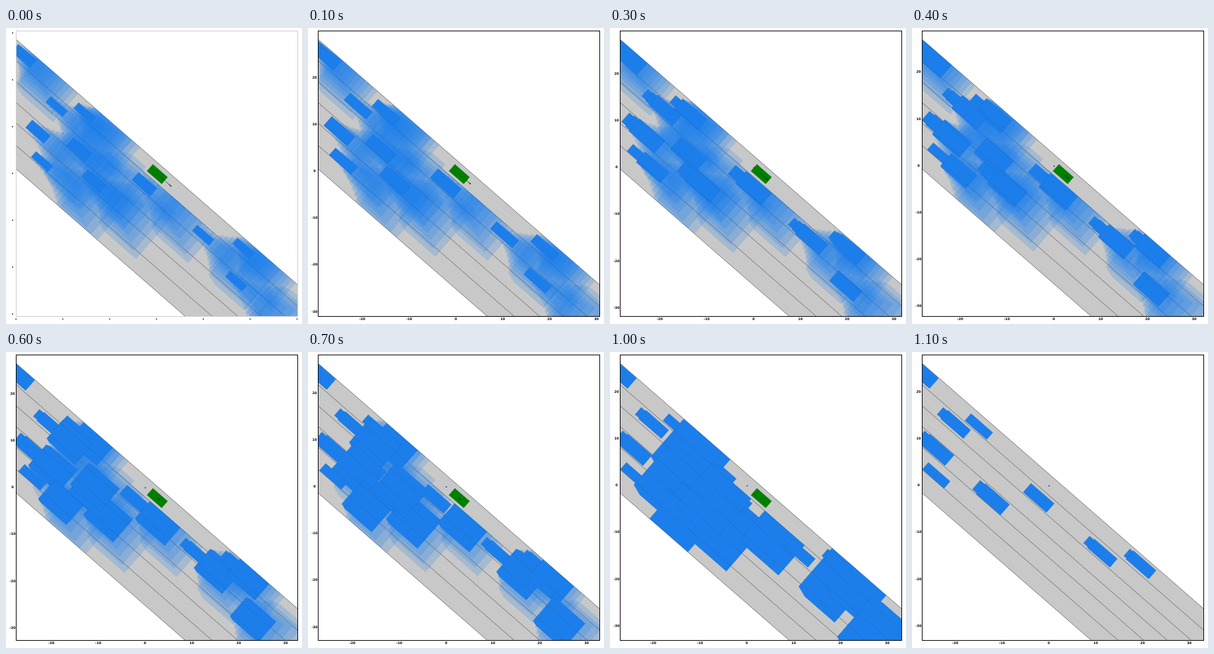
An HTML page with a canvas for the animation above (1.6 s loop, 450 px wide and 450 px high).

```html
<!DOCTYPE html>
<html lang="en">
<head>
<meta charset="utf-8">
<title>Lane occupancy prediction</title>
<style>
  html, body { margin: 0; width: 100%; height: 100%; overflow: hidden; background: #fff; }
  canvas { display: block; width: 450px; height: 450px; }
</style>
</head>
<body>
<canvas id="stage"></canvas>
<script>
const STEP = 100, LOOP = 1600, LAST = 11, HORIZON = 10;
const BLUE = '#1c7eea', EDGE = '#1a70d2';
const PLOT = { x: 15, y: 4, w: 428, h: 434 };
const TICK_GAP = 71.2;
const ANGLE = Math.atan(0.8715);
const UX = Math.cos(ANGLE), UY = Math.sin(ANGLE);
const ROAD_WIDTH = 148.5, LANE_WIDTH = 24.3;
const LANES = [0, 24.5, 48.6, 72.4, 96, 121.6, ROAD_WIDTH];
const BRAKING_DISTANCE = 27.6;

const CAR = { length: 42, width: 14 };
const TRUCK = { length: 45, width: 18 };

// trail: how many early steps stay visible; leaves: step at which the prediction ends
const vehicle = (size, lane, start, speed, trail, leaves = LAST) =>
  ({ ...size, center: (lane + 0.5) * LANE_WIDTH, start, speed, trail, leaves });

const VEHICLES = [
  vehicle(TRUCK, -0.05, -27, 6.5, 2, 5),
  vehicle(CAR, 0.15, 100.5, 6.5, 1),
  vehicle(CAR, 1, 60, 8.9, 2),
  vehicle(TRUCK, 2.95, 61.5, 9.6, 2),
  vehicle(CAR, 4.2, 95.5, 11.4, 1),
  vehicle(TRUCK, 3, 174.7, 9.5, 2),
  vehicle(TRUCK, 1.05, 235.5, 9.8, 1),
  vehicle(CAR, 1.05, 356, 9.2, 2),
  vehicle(CAR, 0, 418, 6.2, 2),
  vehicle(CAR, 1.85, 438.5, 10.4, 0),
  vehicle(TRUCK, 2.1, 126, 10, 0)
];

const canvas = document.getElementById('stage');
const ctx = canvas.getContext('2d');
const dpr = window.devicePixelRatio || 1;
canvas.width = canvas.height = 450 * dpr;

// The ego vehicle brakes evenly to a halt.
const remaining = k => BRAKING_DISTANCE * Math.max(0, 1 - k / HORIZON) ** 2;

// Rear end assumes braking, front end a higher speed, sides widen quadratically.
const rearAt = (v, k) => v.start + v.speed * k - 0.2 * k * k;
const frontAt = (v, k) => v.start + v.length + (v.speed + 1.5) * k;

function occupancy(v, k) {
  const grow = k > 1 ? 0.38 * k * k : 0;
  const rear = rearAt(v, k), front = frontAt(v, k);
  const left = v.center - v.width / 2 - grow;
  const right = v.center + v.width / 2 + grow;
  const cut = grow * 0.15;
  const path = new Path2D();
  path.moveTo(rear, left + cut);
  path.lineTo(rear + cut * 3, left);
  path.lineTo(front, left);
  path.lineTo(front, right);
  path.lineTo(rear + cut * 3, right);
  path.lineTo(rear, right - cut);
  path.closePath();
  return path;
}

function body(v) {
  const rear = rearAt(v, 1) + 1, front = frontAt(v, 1) - 9;
  const width = v.width - 2.6;
  const path = new Path2D();
  path.rect(rear, v.center - width / 2, front - rear, width);
  return path;
}

function solid(path) {
  ctx.fillStyle = BLUE;
  ctx.fill(path);
  ctx.strokeStyle = EDGE;
  ctx.lineWidth = 0.5;
  ctx.stroke(path);
}

function line(d, color, width) {
  ctx.strokeStyle = color;
  ctx.lineWidth = width;
  ctx.beginPath();
  ctx.moveTo(-200, d);
  ctx.lineTo(700, d);
  ctx.stroke();
}

function dot(x, y, size, color) {
  ctx.fillStyle = color;
  ctx.fillRect(x - size / 2, y - size / 2, size, size);
}

function drawRoad() {
  ctx.fillStyle = '#c8c8c8';
  ctx.fillRect(-200, 0, 900, ROAD_WIDTH);
  LANES.slice(1).forEach((d, i) => line((d + LANES[i]) / 2, '#d0d0d0', 0.6));
  LANES.forEach(d => line(d, '#707070', 0.7));
}

// Predictions stay on the road and out of the ego vehicle's stretch of lane.
function clipToReachable() {
  const area = new Path2D();
  area.rect(-200, 0, 900, ROAD_WIDTH);
  area.rect(249, 0, 151, 24);
  ctx.clip(area, 'evenodd');
}

function drawVehicles(k) {
  ctx.fillStyle = BLUE;
  ctx.globalAlpha = 0.2;
  for (const v of VEHICLES) {
    if (k >= v.leaves) continue;
    for (let j = Math.max(k + 1, 2); j <= HORIZON; j++) ctx.fill(occupancy(v, j));
  }
  ctx.globalAlpha = 1;

  for (const v of VEHICLES) {
    if (k === 0) solid(body(v));
    for (let j = 1; j <= Math.min(v.trail, k); j++) solid(occupancy(v, j));
    if (k > 0 && k <= HORIZON && k < v.leaves) solid(occupancy(v, k));
  }
}

function drawEgo(k) {
  ctx.save();
  ctx.translate(230, 222.2);
  ctx.rotate(ANGLE);
  ctx.fillStyle = '#008000';
  ctx.fillRect(-15, -7, 30, 14);
  for (let j = k; j <= HORIZON; j++) dot(remaining(k) - remaining(j), 0, 1.2, '#001800');
  ctx.restore();
}

function drawAxes(k, ox, oy) {
  ctx.strokeStyle = k ? '#000' : '#ccc';
  ctx.lineWidth = 1;
  ctx.strokeRect(PLOT.x + 0.5, PLOT.y + 0.5, PLOT.w, PLOT.h);

  ctx.fillStyle = '#000';
  ctx.font = '700 5px "DejaVu Sans", sans-serif';
  ctx.textBaseline = 'middle';
  const label = (n, x, y, align) => {
    if (k === 0) return dot(x, y, 1.7, '#333');
    ctx.textAlign = align;
    ctx.fillText(String(n * 10), x, y);
  };
  for (let n = -3; n <= 3; n++) {
    const x = ox + TICK_GAP * n, y = oy + TICK_GAP * n;
    if (x > 14 && x < 444) label(n, x, 442.5, 'center');
    if (y > 5 && y < 439) label(-n, 10, y, k ? 'center' : 'right');
  }
}

function draw(k) {
  const shift = remaining(k);
  const ox = 208 + UX * shift, oy = 203 + UY * shift;
  ctx.setTransform(dpr, 0, 0, dpr, 0, 0);
  ctx.fillStyle = '#fff';
  ctx.fillRect(0, 0, 450, 450);

  ctx.save();
  ctx.beginPath();
  ctx.rect(PLOT.x, PLOT.y, PLOT.w, PLOT.h);
  ctx.clip();
  ctx.translate(15, 17);
  ctx.rotate(ANGLE);
  drawRoad();
  ctx.save();
  ctx.translate(shift, 0);
  clipToReachable();
  drawVehicles(k);
  ctx.restore();
  LANES.forEach(d => line(d, 'rgba(40,50,70,0.25)', 0.6));
  ctx.restore();

  dot(ox + 0.5, oy + 0.5, 1.6, '#101080');
  if (k < LAST) drawEgo(k);
  drawAxes(k, ox, oy);
}

let shown = -1;
const start = performance.now();
function tick() {
  const t = (performance.now() - start) % LOOP;
  const k = Math.min(LAST, Math.floor(t / STEP));
  if (k !== shown) draw(shown = k);
  requestAnimationFrame(tick);
}
tick();
</script>
</body>
</html>
```
